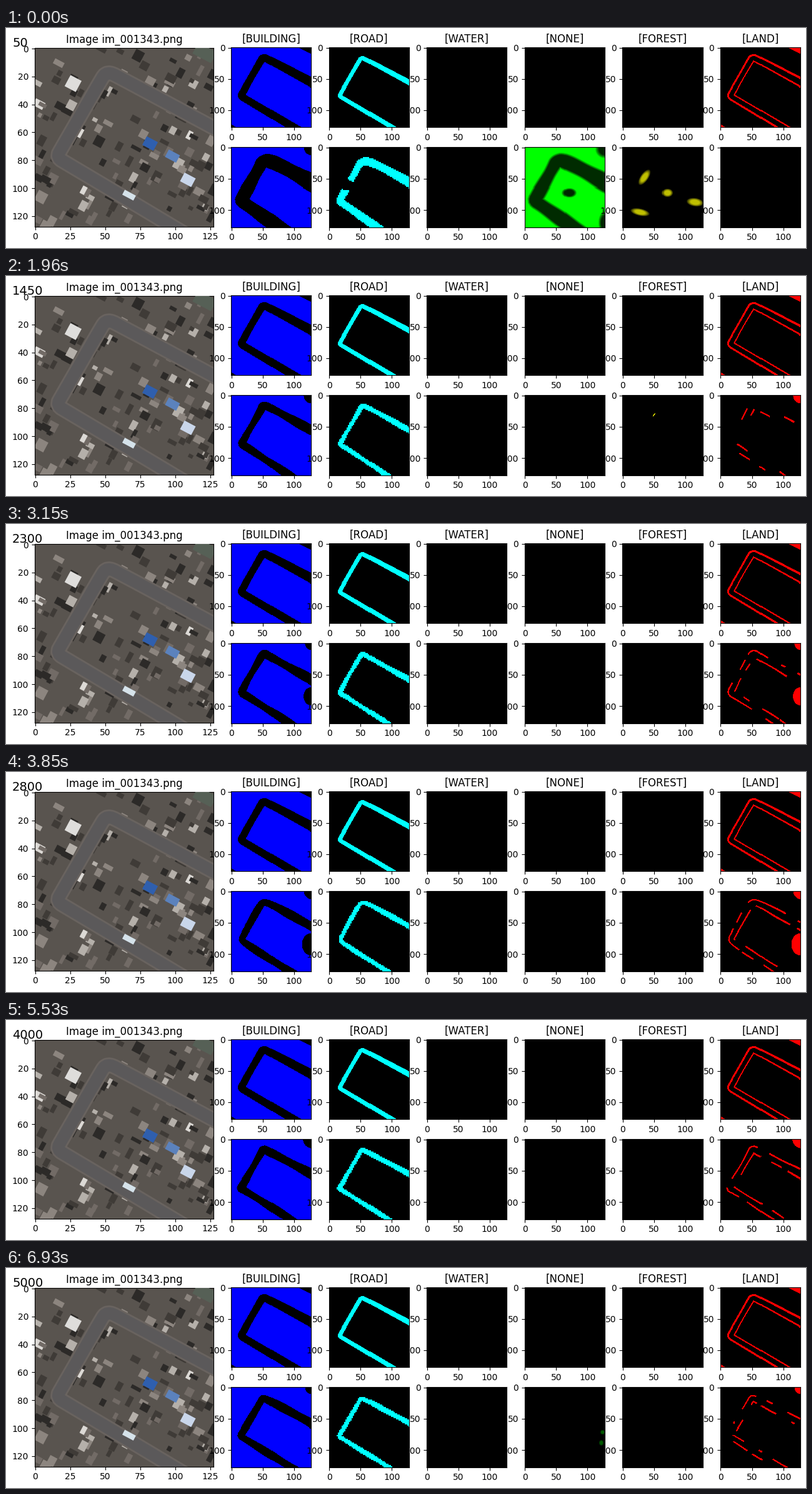
Animation of 1280 by 353 pixels, one loop 7 s. Source, as a matplotlib script:

```python
import numpy as np
import matplotlib.pyplot as plt
from matplotlib.animation import FuncAnimation
from matplotlib.collections import PatchCollection
from matplotlib.patches import Polygon

W, H, N = 1280, 353, 128
FRAMES, INTERVAL = 100, 70
NAMES = ["BUILDING", "ROAD", "WATER", "NONE", "FOREST", "LAND"]
COLORS = np.array([[0, 0, 255], [0, 255, 255], [255, 0, 255],
                   [0, 255, 0], [255, 255, 0], [255, 0, 0]])

X, Y = np.meshgrid(np.arange(N), np.arange(N))
GRID = np.column_stack([X.ravel(), Y.ravel()]).astype(np.float32)

# Centre line of the road: right edge, top bend, left bend, bottom edge
PATH = np.array([(140, 63.5), (62, 21.5), (51, 16), (46, 24),
                 (19, 71), (15, 78), (24, 83), (124, 143)])

rng = np.random.default_rng(4)
SPEED = rng.uniform(0.2, 0.7, PATH.shape)
PHASE = rng.uniform(0, 2 * np.pi, PATH.shape)


def smooth(p, rounds=3, samples=160):
    """Round the corners, then space the points evenly."""
    for _ in range(rounds):
        a, b = p[:-1], p[1:]
        cut = np.stack([0.75 * a + 0.25 * b, 0.25 * a + 0.75 * b], 1).reshape(-1, 2)
        p = np.vstack([p[:1], cut, p[-1:]])
    length = np.append(0, np.cumsum(np.hypot(*np.diff(p, axis=0).T)))
    at = np.linspace(0, length[-1], samples)
    return np.column_stack([np.interp(at, length, axis) for axis in p.T])


def corridor(path):
    """Per pixel: signed distance (positive inside the bend), place, half width."""
    line = smooth(path).astype(np.float32)
    near = ((line ** 2).sum(1) - 2 * GRID @ line.T).argmin(1)
    t = np.gradient(line, axis=0)
    t /= np.hypot(*t.T)[:, None]
    dx, dy = (GRID - line[near]).T
    d = t[near, 1] * dx - t[near, 0] * dy
    s = near / (len(line) - 1)
    half = np.interp(s, [0, 0.45, 1], [7.9, 5.5, 6.8])
    return [a.reshape(N, N) for a in (d, s, half)]


def radius(x, y, rx, ry, deg=0):
    """Squared radius of an ellipse, 1 on the rim."""
    c, s = np.cos(np.radians(deg)), np.sin(np.radians(deg))
    u, v = (X - x) * c + (Y - y) * s, (Y - y) * c - (X - x) * s
    return (u / rx) ** 2 + (v / ry) ** 2


def spot(*shape):
    return np.clip(1.3 * (1 - radius(*shape)), 0, 1)


def truth_masks():
    d, _, half = corridor(PATH)
    band = abs(d) < half
    road = abs(d - 0.5) < 0.58 * half
    corners = ((X - 105) * 12 / 23 > Y) | (Y > 123 + X * 5 / 8)
    m = np.zeros((6, N, N))
    m[0] = ~(band | corners)
    m[1] = road
    m[5] = (band & ~road) | corners
    return m


def predicted_masks(k):
    early = max(0, 1 - k / 8) ** 2
    path = PATH + 1.2 * np.sin(k * SPEED + PHASE)
    path[2:7] += (0, 7 * early)
    path[-1] -= (7 + 20 * early, 0)
    d, s, half = corridor(path)
    half = half * (1 + 0.75 * early + 0.1 * np.sin(25 * s + 0.4 * k))
    band = abs(d) < half
    m = np.zeros((6, N, N))

    # The corner stays; a bump on the right comes and goes
    corner, bump = 13 + 2 * np.sin(k / 9), 15 * np.exp(-((k - 55) / 15) ** 4)
    patch = X - 128 + 1j * Y
    patch = (abs(patch) < corner) | (np.hypot(X - 127, (Y - 84) / 1.2) < bump)
    m[0] = ~(band | patch)

    road = abs(d) < (0.62 - 0.05 * early) * half
    road &= radius(22, 58, 18 * early + 0.01, 8 * early + 0.01, 10) > 1
    m[1] = road[::2, ::2].repeat(2, 0).repeat(2, 1)

    if early:
        edge = np.clip((abs(d) - half) / 5 + 0.5, 0.17, 1)
        holes = spot(70, 72, 12, 8) + spot(127, 3, 16, 15) + spot(128, 120, 12, 20)
        m[3] = early * edge * np.clip(1 - holes, 0.15, 1)
        blobs = spot(71, 72, 9, 7) + spot(115, 87, 14, 7, 8) + spot(28, 103, 16, 6, 12)
        m[4] = 0.75 * early * blobs
    m[3] += 0.35 * max(0, (k - 90) / 9) * (spot(123, 71, 4, 4) + spot(121, 88, 4, 5))
    size = np.clip(1 - (k - 12) / 22, 0, 1)
    if size:
        streak = spot(35 + 0.55 * k, 48 - 0.6 * k, 15 * size, (3.5 + 3 * early) * size, -55)
        m[4] = np.maximum(m[4], (1 - 0.25 * early) * streak)

    # Land grows in pieces along both road sides
    side = d > 0
    ripple = (np.sin(20 * s + 0.1 * k + 2 * side) + np.sin(47 * s - 0.07 * k + side)) / 2
    cover = np.interp(k, [0, 66, 99], [0, 0.8, 0.5])
    m[5] = (band & ~road & (ripple < 2 * cover - 1)) | (patch & (early == 0))
    return m


def paint(mask, color):
    return (np.clip(mask, 0, 1)[..., None] * color).astype(np.uint8)


def panel(x, y, size, step_x, step_y):
    ax = fig.add_axes([x / W, 1 - (y + size) / H, size / W, size / H])
    ax.set(xlim=(-0.5, N - 0.5), ylim=(N - 0.5, -0.5),
           xticks=range(0, N, step_x), yticks=range(0, N, step_y))
    return ax


def draw_aerial(ax):
    """Flat roofs around a road, in the muted tones of a view from above."""
    rng = np.random.default_rng(7)
    ax.set_facecolor("#59544f")
    tones = ["#2c2a28", "#3f3b37", "#726b66", "#8c857f", "#b5b0aa", "#dcd9d5"]
    turn = np.radians(28)
    rot = np.array([[np.cos(turn), np.sin(turn)], [-np.sin(turn), np.cos(turn)]])

    def roof(x, y, w, h):
        box = np.array([(-w, -h), (w, -h), (w, h), (-w, h)]) / 2
        return Polygon(box @ rot + (x, y))

    def add(shapes, fills, z):
        ax.add_collection(PatchCollection(shapes, facecolors=fills, linewidths=0, zorder=z))

    add([roof(*rng.uniform(0, N, 2), *rng.uniform(2.5, 8, 2)) for _ in range(150)],
        rng.choice(tones, 150, p=[0.25, 0.25, 0.2, 0.14, 0.1, 0.06]), 1)
    for width, fill in [(18, "#69635f"), (14, "#5b595a")]:
        ax.plot(*smooth(PATH).T, lw=width, color=fill, zorder=2)
    add([roof(82, 68, 9, 7), roof(98, 77, 9, 6), roof(109, 94, 9, 7),
         roof(67, 105, 9, 4), roof(27, 25, 9, 9), roof(121, 3, 15, 9)],
        ["#2f5fae", "#5b82bd", "#c9d6ea", "#d5e2ea", "#dedddb", "#566056"], 3)


plt.rcParams["font.family"] = "DejaVu Sans"
fig = plt.figure(figsize=(W / 100, H / 100), dpi=100, facecolor="white")

aerial = panel(45.8, 32, 286.6, 25, 20)
aerial.set_title("Image im_001343.png")
draw_aerial(aerial)

views = []
for i, (name, mask) in enumerate(zip(NAMES, truth_masks())):
    for top in (31.2, 191.4):
        ax = panel(360.1 + 156.57 * i, top, 128.2, 50, 50)
        view = ax.imshow(paint(mask, COLORS[i]), interpolation="nearest", aspect="auto")
        if top < 100:
            ax.set_title(f"[{name}]")
        else:
            views.append(view)

counter = fig.text(10 / W, 1 - 30 / H, "", fontsize=14, va="baseline")


def update(k):
    counter.set_text(str(50 * (k + 1)))
    for view, mask, color in zip(views, predicted_masks(k), COLORS):
        view.set_data(paint(mask, color))
    return [counter, *views]


anim = FuncAnimation(fig, update, frames=FRAMES, interval=INTERVAL,
                     repeat=True, repeat_delay=0)
plt.show()
```
